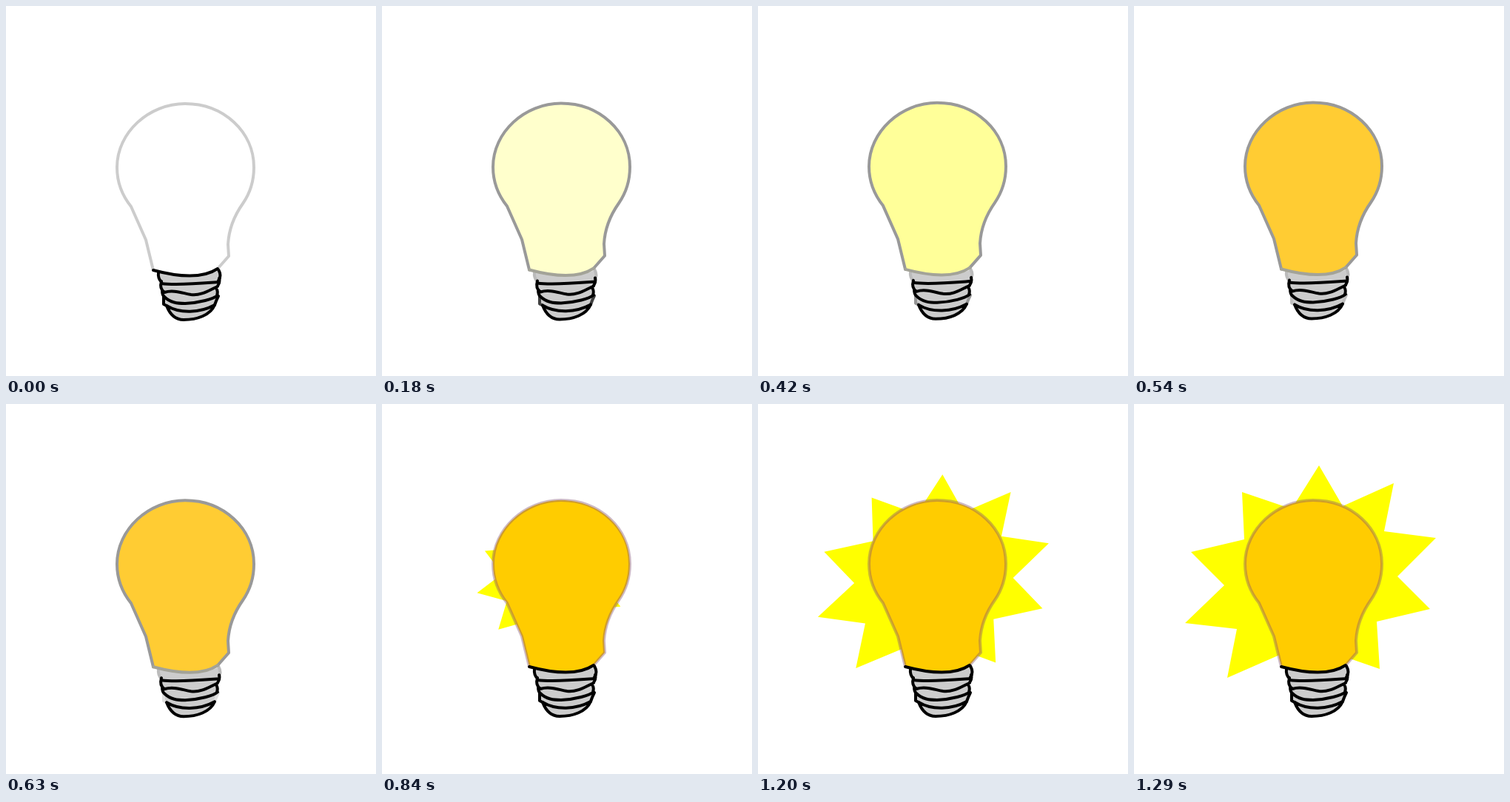
Animation of 500 by 500 pixels, one loop 1320 ms. Source, as an HTML page with a canvas:

```html
<!DOCTYPE html>
<html lang="en">
<head>
<meta charset="utf-8">
<title>Light bulb</title>
<style>
  html, body { margin: 0; width: 100%; height: 100%; overflow: hidden; background: #fff; }
  canvas { display: block; width: 100vmin; height: 100vmin; }
</style>
</head>
<body>
<canvas id="stage" width="500" height="500"></canvas>
<script>
const ctx = document.getElementById('stage').getContext('2d');
const STEP = 30, STEPS = 44, LIT = 24;

const rim = 'M199 355 L189 314 L169 269 C157 254 150 236 150 216 C150 169 193 130 242 130 ' +
  'C294 130 335 168 335 216 C335 236 329 252 320 265 C308 282 301 302 300 320 L301 336 L286 353';
const collar = new Path2D('M199 355 C225 362 262 369 286 353');
const outline = new Path2D(rim);
const glass = new Path2D(rim + ' C262 369 225 362 199 355 Z');

const socket = new Path2D('M205 356 Q205 367 210 371 L211 382 L213 390 L213 402 L217 403 ' +
  'C222 416 230 422 240 422 C258 422 276 416 282 402 L287 389 L284 380 L288 370 Q292 364 288 355 ' +
  'C262 369 225 362 205 356 Z');
const bumps = new Path2D('M206 358 Q205 366 210 371 M287 354 Q292 363 287 369');
const sides = new Path2D('M213 390 L213 401 L217 403 M287 390 Q284 396 282 402');
const threads = new Path2D(
  'M288 366 Q290 372 284 379 Q287 384 285 389 M288 371 C262 373 230 376 210 373 ' +
  'M210 370 Q207 380 214 385 C226 381 238 386 250 388 C264 390 276 381 286 377 ' +
  'M211 382 Q211 389 214 391 C222 399 232 400 242 400 C262 399 280 394 286 389 ' +
  'M217 403 C235 414 262 413 282 402 M217 403 C222 416 230 422 240 422 C258 422 276 416 282 402');

// The burst at full size; its lowest part stays behind the socket.
const burst = [
  [250, 83], [282, 138], [351, 107], [338, 172], [408, 181], [356, 233], [400, 277],
  [328, 294], [332, 358], [280, 340], [215, 331], [126, 370], [139, 304], [69, 296],
  [122, 245], [77, 200], [149, 183], [146, 119], [202, 138], [216, 137]
];

function stroke(path, color) {
  ctx.strokeStyle = color;
  ctx.lineWidth = 4;
  ctx.stroke(path);
}

function fill(path, color) {
  ctx.fillStyle = color;
  ctx.fill(path);
}

function glow(step) {
  if (step < 3) return '#ffffff';
  if (step < 8) return '#ffffcc';
  if (step < 15) return '#ffff99';
  return step < 22 ? '#ffcc33' : '#ffcc00';
}

function drawBurst(step) {
  const back = (STEPS - 1 - step) / 7;
  const path = new Path2D();
  for (const [x, y] of burst) {
    path.lineTo(
      x - back * (0.195 * (x - 222) + 0.028 * (y - 222)),
      y - back * (0.187 * (y - 226) - 0.042 * (x - 210)));
  }
  path.closePath();
  fill(path, '#ffff00');
}

function draw(step) {
  const warm = Math.min(step / LIT, 1);
  const lit = step >= LIT;
  const fading = step > 0 && !lit;
  const faded = Math.round(255 * warm);

  ctx.fillStyle = '#fff';
  ctx.fillRect(0, 0, 500, 500);
  ctx.save();
  ctx.lineCap = ctx.lineJoin = 'round';
  if (lit) drawBurst(step);
  ctx.translate(0, 2 * (1 - warm));
  fill(socket, '#cccccc');
  stroke(bumps, fading ? '#bbbbbb' : '#000');
  stroke(sides, fading ? `rgb(${faded},${faded},${faded})` : '#000');
  stroke(threads, '#000');
  fill(glass, glow(step));
  stroke(outline, lit ? 'rgba(130,80,110,0.4)' : fading ? '#999999' : '#cccccc');
  stroke(collar, fading ? '#a3a398' : '#000');
  ctx.restore();
}

function tick() {
  draw(Math.floor(performance.now() / STEP) % STEPS);
  requestAnimationFrame(tick);
}
tick();
</script>
</body>
</html>
```
